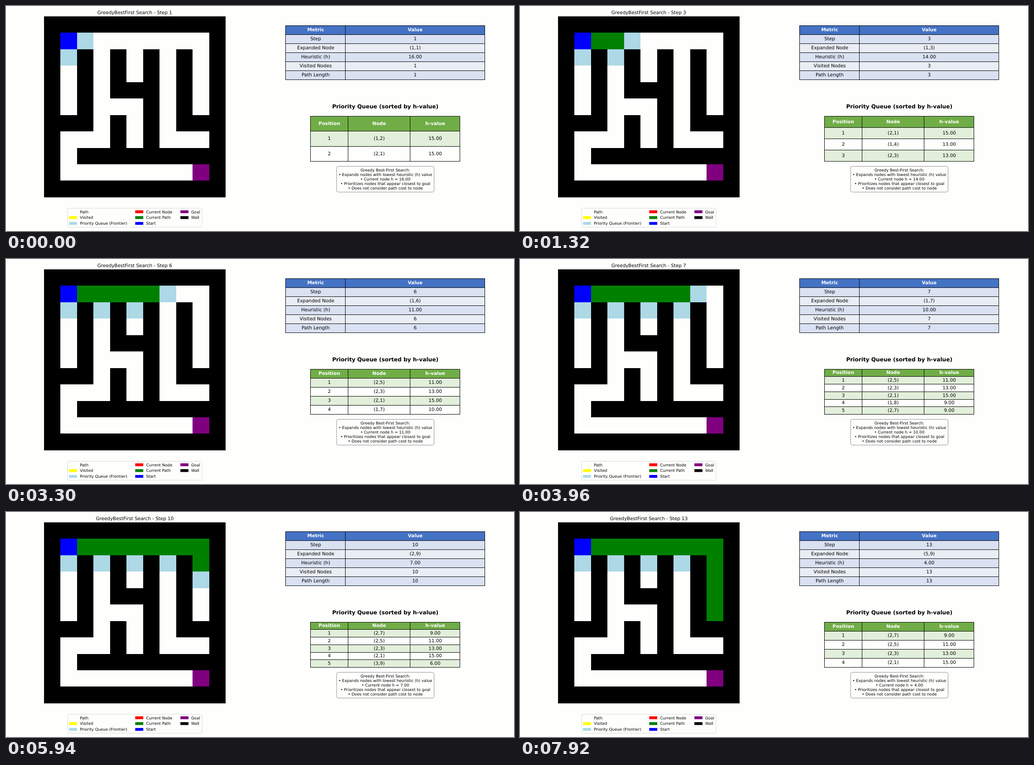
Recreate the animation shown at these times as an HTML page. Size 1122 by 499 pixels, loop 8 s.

```html
<!DOCTYPE html>
<html lang="en">
<head>
<meta charset="utf-8">
<title>Greedy best-first search</title>
<style>
  html, body { margin: 0; width: 100%; height: 100%; overflow: hidden; background: #fefefc; }
  svg { display: block; }
  text { font-family: "DejaVu Sans", sans-serif; text-rendering: geometricPrecision; white-space: pre; }
</style>
</head>
<body>
<svg width="1122" height="499" viewBox="0 0 1122 499">
  <g id="fixed"></g>
  <g id="live"></g>
</svg>
<script>
const LOOP = 8000, STEP_MS = 660, STEPS = 13;
const PAPER = '#fefefc';
const SMALL = 8.66, BODY = 10.39, LARGE = 12.12;

const MAZE = [
  '###########',
  '#.........#',
  '#.#.#.#.#.#',
  '#.#.#.#.#.#',
  '#.#.###.#.#',
  '#.#...#.#.#',
  '###.#.#.###',
  '#...#.#...#',
  '#.#########',
  '#.........#',
  '###########'
];
const START = [1, 1], GOAL = [9, 9];
const MOVES = [[0, 1], [1, 0], [0, -1], [-1, 0]];

const same = (a, b) => a[0] === b[0] && a[1] === b[1];
const has = (list, cell) => list.some(c => same(c, cell));
const dist = ([r, c]) => Math.abs(GOAL[0] - r) + Math.abs(GOAL[1] - c);
const label = ([r, c]) => `(${r},${c})`;

// Run the search once and keep a snapshot of each step.
function search() {
  const states = [], visited = [];
  let queue = [START];
  for (let i = 0; i < STEPS; i++) {
    queue = [...queue].sort((a, b) => dist(a) - dist(b));
    const node = queue.shift();
    visited.push(node);
    for (const [dr, dc] of MOVES) {
      const next = [node[0] + dr, node[1] + dc];
      if (MAZE[next[0]][next[1]] === '.' && !has(visited, next) && !has(queue, next)) queue.push(next);
    }
    states.push({ step: i + 1, node, path: [...visited], queue: [...queue] });
  }
  return states;
}

// Drawing helpers, each returning SVG markup
const rect = (x, y, w, h, fill, more = '') =>
  `<rect x="${x}" y="${y}" width="${w}" height="${h}" fill="${fill}" ${more}/>`;

const text = (x, y, str, size = BODY, { anchor = 'middle', fill = '#000', bold = false } = {}) =>
  `<text x="${x}" y="${y}" font-size="${size}" text-anchor="${anchor}" fill="${fill}"` +
  `${bold ? ' font-weight="bold"' : ''}>${str}</text>`;

const edgeX = c => Math.round(84 + 36.45 * c);
const edgeY = r => Math.round(22.95 + 36.45 * r);
const cell = ([r, c], fill) =>
  rect(edgeX(c), edgeY(r), edgeX(c + 1) - edgeX(c), edgeY(r + 1) - edgeY(r), fill);

function table({ xs, centers, top, height, rows, head, bands }) {
  const rowH = height / rows.length;
  const lineY = i => Math.floor(top + i * rowH) + 0.5;
  const left = xs[0], right = xs[xs.length - 1];
  let fills = '', lines = '', words = '';
  rows.forEach((row, i) => {
    fills += rect(left, lineY(i), right - left, lineY(i + 1) - lineY(i), i ? bands[(i - 1) % 2] : head);
    const base = top + (i + 0.5) * rowH + 0.276 * BODY;
    row.forEach((str, j) => {
      words += text(centers[j], base, str, BODY, i ? {} : { fill: '#fff', bold: true });
    });
  });
  for (let i = 0; i <= rows.length; i++) lines += `M${left} ${lineY(i)}H${right}`;
  for (const x of xs) lines += `M${x} ${lineY(0)}V${lineY(rows.length)}`;
  return fills + `<path d="${lines}" stroke="#000" stroke-linecap="square" fill="none"/>` + words;
}

function legend() {
  const columns = [
    [139.2, 163.2, [['Path', PAPER], ['Visited', '#ffff00'], ['Priority Queue (Frontier)', '#add8e6']]],
    [285.4, 309.4, [['Current Node', '#ff0000'], ['Current Path', '#008000'], ['Start', '#0000ff']]],
    [385.2, 408.9, [['Goal', '#800080'], ['Wall', '#000000']]]
  ];
  let out = rect(136, 448.5, 297, 42, PAPER, 'rx="2" stroke="#d6d6d6" stroke-width=".87"');
  for (const [boxX, textX, items] of columns) {
    items.forEach(([name, color], i) => {
      const y = 459.5 + 12.9 * i;
      out += rect(boxX, y - 6.3, 17.8, 6.3, color) + text(textX, y, name, SMALL, { anchor: 'start' });
    });
  }
  return out;
}

function board() {
  let out = rect(84, 23, 401, 401.4, '#000');
  MAZE.forEach((row, r) => [...row].forEach((ch, c) => {
    if (ch === '.') out += cell([r, c], PAPER);
  }));
  return out + cell(GOAL, '#800080');
}

function note(h) {
  const lines = [
    'Greedy Best-First Search:',
    '• Expands nodes with lowest heuristic (h) value',
    `• Current node h = ${h}`,
    '• Prioritizes nodes that appear closest to goal',
    '• Does not consider path cost to node'
  ];
  return lines.map((line, i) => text(837.9, 366.8 + 10.05 * i, line, SMALL)).join('');
}

function scene({ step, node, path, queue }) {
  const h = dist(node).toFixed(2);
  return text(284.4, 18, `GreedyBestFirst Search - Step ${step}`) +
    queue.map(c => cell(c, '#add8e6')).join('') +
    path.map(c => cell(c, '#008000')).join('') +
    cell(START, '#0000ff') +
    table({
      xs: [617.5, 749.5, 1057.5], centers: [684, 903.8], top: 43.4, height: 120.2,
      head: '#4472c4', bands: ['#d9e1f2', '#e9edf4'],
      rows: [['Metric', 'Value'], ['Step', step], ['Expanded Node', label(node)],
        ['Heuristic (h)', h], ['Visited Nodes', path.length], ['Path Length', path.length]]
    }) +
    table({
      xs: [672.5, 755.5, 892.5, 1002.5], centers: [714.1, 824.2, 948], top: 244.2, height: 100.3,
      head: '#70ad47', bands: ['#e2efda', PAPER],
      rows: [['Position', 'Node', 'h-value'],
        ...queue.map((c, i) => [i + 1, label(c), dist(c).toFixed(2)])]
    }) +
    note(h);
}

const fixed = document.getElementById('fixed');
const live = document.getElementById('live');
fixed.innerHTML = board() + legend() +
  text(837.7, 227.2, 'Priority Queue (sorted by h-value)', LARGE, { bold: true }) +
  rect(730.2, 355.5, 215.3, 57.2, PAPER, 'rx="4" stroke="#7f7f7f" stroke-width=".87"');

const scenes = search().map(scene);
const begin = performance.now();
let shown = -1;

function tick() {
  const t = (performance.now() - begin) % LOOP;
  const i = Math.min(STEPS - 1, Math.floor(t / STEP_MS));
  if (i !== shown) {
    live.innerHTML = scenes[i];
    shown = i;
  }
  requestAnimationFrame(tick);
}
tick();
</script>
</body>
</html>
```
